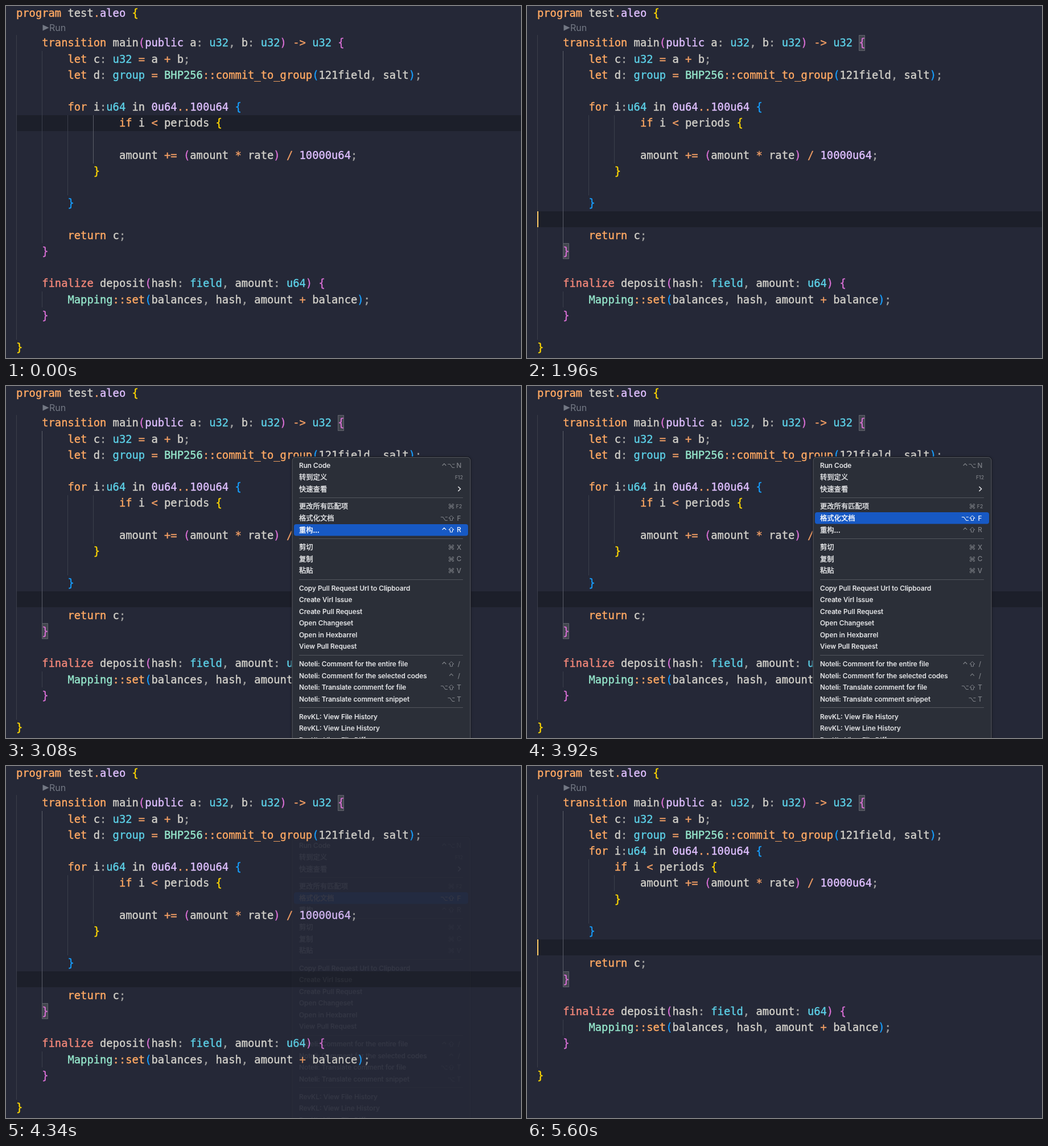
Recreate the animation shown at these times as an HTML page with a canvas. Size 905x619 px, loop 5.67 s.

```html
<!DOCTYPE html>
<html lang="en">
<head>
<meta charset="utf-8">
<title>Code formatting</title>
<style>
  html, body { margin: 0; width: 100%; height: 100%; overflow: hidden; background: #252837; }
  canvas { position: absolute; left: 0; top: 0; }
</style>
</head>
<body>
<canvas id="editor" width="905" height="619"></canvas>
<canvas id="menu" width="905" height="619"></canvas>
<script>
const W = 905, H = 619, LOOP = 5670, STEP = 70;
const editor = document.getElementById('editor').getContext('2d');
const menuCanvas = document.getElementById('menu');
const menu = menuCanvas.getContext('2d');

// Text with a hairline outline, for slightly heavier strokes
function ink(c, text, x, y, color, outline) {
  c.fillStyle = c.strokeStyle = color;
  c.lineWidth = outline;
  c.lineJoin = 'round';
  c.fillText(text, x, y);
  c.strokeText(text, x, y);
}

// ---- Editor ----
const LEFT = 18, TOP = 50.9, ROW = 28.2;
const CODE_FONT = '18.8px "DejaVu Sans Mono", monospace';
const FG = '#d2d0c9', DIM = '#a3a3a2', ORANGE = '#ffa963', OPERATOR = '#f29e64';
const CYAN = '#5ccfe6', LAVENDER = '#dfbfff', MINT = '#95e6cb', SALMON = '#f28779';
const BRACKETS = ['#ffd700', '#da70d6', '#179fff'];

const WORDS = {};
const paint = (color, words) => words.split(' ').forEach(w => WORDS[w] = color);
paint(ORANGE, 'program transition let for if return commit_to_group set');
paint(CYAN, 'u32 u64 group field');
paint(LAVENDER, 'public aleo');
paint(MINT, 'BHP256 Mapping');
paint(SALMON, 'finalize');

const HEAD = `program test.aleo {
    transition main(public a: u32, b: u32) -> u32 {
        let c: u32 = a + b;
        let d: group = BHP256::commit_to_group(121field, salt);
`;
const TAIL = `            }

        }

        return c;
    }

    finalize deposit(hash: field, amount: u64) {
        Mapping::set(balances, hash, amount + balance);
    }

}`;
const LOOP_LINE = '        for i:u64 in 0u64..100u64 {\n';
const AMOUNT_LINE = '                amount += (amount * rate) / 10000u64;\n';

// Guides: [column, first row, row after last]
const MESSY = {
  code: HEAD + '\n' + LOOP_LINE + '                if i < periods {\n\n' + AMOUNT_LINE + TAIL,
  guides: [[0, 0, 19], [4, 1, 13], [8, 5, 10], [12, 5, 8], [4, 16, 17]],
  caretRow: 11, closeRow: 13
};
const TIDY = {
  code: HEAD + LOOP_LINE + '            if i < periods {\n' + AMOUNT_LINE + TAIL,
  guides: [[0, 0, 17], [4, 1, 11], [8, 4, 8], [12, 5, 6], [4, 14, 15]],
  caretRow: 9, closeRow: 11
};

const rowY = row => TOP + row * ROW;

function tokenColor(token) {
  if (/^\d+u64$/.test(token)) return LAVENDER;
  if (/^\w/.test(token)) return WORDS[token] || FG;
  return /^[,;:]$/.test(token) ? DIM : OPERATOR;
}

function drawCode(code) {
  const c = editor;
  c.font = CODE_FONT;
  const cw = c.measureText('0').width;
  let depth = 0;
  code.split('\n').forEach((line, i) => {
    const base = i ? rowY(i - 1) + 20.5 : 19.3;
    for (const m of line.matchAll(/\w+|::|->|\+=|\.\.|\S/g)) {
      const token = m[0];
      if (/[)}]/.test(token)) depth--;
      const color = /[(){}]/.test(token) ? BRACKETS[depth % 3] : tokenColor(token);
      if (/[({]/.test(token)) depth++;
      ink(c, token, LEFT + m.index * cw, base, color, .4);
    }
  });
}

function drawRunLens() {
  const c = editor;
  c.fillStyle = '#737884';
  c.beginPath();
  c.moveTo(64.5, 33);
  c.lineTo(75.5, 38.3);
  c.lineTo(64.5, 43.6);
  c.fill();
  c.font = '16px Inter, sans-serif';
  c.fillText('Run', 76, 44);
}

function drawMatch(col, row, cw) {
  const x = Math.round(LEFT + col * cw), y = Math.round(rowY(row));
  editor.fillStyle = '#43464f';
  editor.fillRect(x, y, 11, 28);
  editor.lineWidth = 1;
  editor.strokeStyle = '#61646c';
  editor.strokeRect(x + .5, y + .5, 10, 27);
}

function drawEditor(t) {
  const c = editor;
  const doc = t < 4480 ? MESSY : TIDY;
  const clicked = t >= 1960;
  const caretRow = clicked ? doc.caretRow : 5;
  c.fillStyle = '#252837';
  c.fillRect(0, 0, W, H);
  c.fillStyle = '#1c1f2a';
  c.fillRect(19, Math.round(rowY(caretRow)), W, 28);

  c.font = CODE_FONT;
  const cw = c.measureText('0').width;
  doc.guides.forEach(([col, from, to], i) => {
    const y = Math.round(rowY(from));
    c.fillStyle = i === (clicked ? 1 : 3) ? '#5b5f69' : '#3b3f4b';
    c.fillRect(Math.floor(LEFT + col * cw), y, 1, Math.round(rowY(to)) - y);
  });
  if (clicked) {
    drawMatch(50, 0, cw);
    drawMatch(4, doc.closeRow, cw);
  }
  drawRunLens();
  drawCode(doc.code);

  const caretOn = [[1960, 2870], [3360, 3850], [4480, 4970], [5460, LOOP]]
    .some(([a, b]) => t >= a && t < b);
  if (caretOn) {
    c.fillStyle = '#ffcc66';
    c.fillRect(18, Math.round(rowY(caretRow)), 2, 28);
  }
}

// ---- Context menu ----
const PITCH = 20.52, GAP = 10.3;
const GROUPS = [
  ['Run Code|^⌥N', '转到定义|F12', '快速查看|>'],
  ['更改所有匹配项|⌘F2', '格式化文档|⌥⇧F', '重构...|^⇧R'],
  ['剪切|⌘X', '复制|⌘C', '粘贴|⌘V'],
  ['Copy Pull Request Url to Clipboard', 'Create Virl Issue', 'Create Pull Request',
    'Open Changeset', 'Open in Hexbarrel', 'View Pull Request'],
  ['Noteli: Comment for the entire file|^⇧/', 'Noteli: Comment for the selected codes|^/',
    'Noteli: Translate comment for file|⌥⇧T', 'Noteli: Translate comment snippet|⌥T'],
  ['RevKL: View File History', 'RevKL: View Line History', 'RevKL: View File Diff']
];

const items = [], rules = [];
let nextY = 140;
GROUPS.forEach((group, g) => {
  if (g) {
    rules.push(nextY - PITCH / 2 + GAP / 2);
    nextY += GAP;
  }
  for (const entry of group) {
    const [label, keys = ''] = entry.split('|');
    items.push({ label, keys, y: nextY });
    nextY += PITCH;
  }
});

// [time, selected item]
const SELECTION = [
  [2380, -1], [2520, 11], [2730, 10], [2800, 8], [2870, 7], [3010, 6], [3080, 5],
  [3150, 4], [3360, 3], [3570, 4], [4060, -1], [4130, 4]
];

function line(points, width, closed) {
  menu.lineWidth = width;
  menu.beginPath();
  points.forEach(([x, y]) => menu.lineTo(x, y));
  if (closed) menu.closePath();
  menu.stroke();
}

function drawModifier(key, x, y) {
  if (key === '^') {
    line([[x - 3.3, y], [x, y - 3.5], [x + 3.3, y]], 1.1);
  } else if (key === '⇧') {
    line([[x, y - 4.5], [x + 4.5, y], [x + 2, y], [x + 2, y + 4],
      [x - 2, y + 4], [x - 2, y], [x - 4.5, y]], 1, true);
  } else {
    menu.font = '12px "DejaVu Sans", sans-serif';
    menu.fillText(key, x, y + 4.3);
  }
}

function drawKeys(keys, y, color) {
  const c = menu;
  if (keys === '>') {
    c.strokeStyle = '#e4e5e8';
    line([[794.5, y - 4], [798.7, y], [794.5, y + 4]], 1.6);
    return;
  }
  c.fillStyle = c.strokeStyle = color;
  c.textAlign = 'center';
  const fkey = keys.match(/F\d+$/);
  const last = fkey ? fkey[0] : keys.slice(-1);
  c.font = `500 ${fkey ? 8.7 : 11.7}px Inter, sans-serif`;
  c.fillText(last, 796, y + (fkey ? 3.5 : 4.2));
  const mods = [...keys.slice(0, -last.length)].reverse();
  mods.forEach((key, i) => drawModifier(key, 782.5 - i * 12.5, y));
  c.textAlign = 'left';
}

function panel(x, y, w, h, r) {
  menu.beginPath();
  menu.roundRect(x, y, w, h, r);
}

function drawMenu(t) {
  const c = menu;
  const opacity = t < 2380 ? 0 : Math.min(1, Math.max(0, 1 - (t - 4130) / 226));
  menuCanvas.style.opacity = opacity;
  if (!opacity) return;
  c.clearRect(0, 0, W, H);

  c.save();
  c.shadowColor = 'rgba(0,0,0,.3)';
  c.shadowBlur = 5;
  c.fillStyle = '#2b2f38';
  panel(502.5, 125, 314, 560, 6);
  c.fill();
  c.restore();
  c.lineWidth = 1;
  c.strokeStyle = '#14161c';
  panel(502, 124.5, 315, 560, 6.5);
  c.stroke();
  c.strokeStyle = '#565960';
  panel(503, 125.5, 313, 560, 5.5);
  c.stroke();

  c.fillStyle = '#53565e';
  rules.forEach(y => c.fillRect(515, Math.floor(y), 288, 1));

  const selected = SELECTION.filter(s => t >= s[0]).pop()[1];
  items.forEach(({ label, keys, y }, i) => {
    const on = i === selected;
    if (on) {
      c.fillStyle = '#1759c4';
      panel(506, Math.round(y - PITCH / 2), 306, PITCH, 4);
      c.fill();
    }
    const chinese = label.charCodeAt(0) > 255;
    c.font = `500 ${chinese ? 12.3 : 11.86}px Inter, "Noto Sans CJK SC", "Noto Sans CJK", sans-serif`;
    ink(c, label, 515, y + (chinese ? 4.6 : 4.2), on ? '#ffffff' : '#e6e7e9', chinese ? .4 : .2);
    if (keys) drawKeys(keys, y, on ? '#ffffff' : '#7f8288');
  });
}

function frame(now) {
  const t = Math.floor((now % LOOP) / STEP) * STEP;
  drawEditor(t);
  drawMenu(t);
  requestAnimationFrame(frame);
}
requestAnimationFrame(frame);
</script>
</body>
</html>
```
